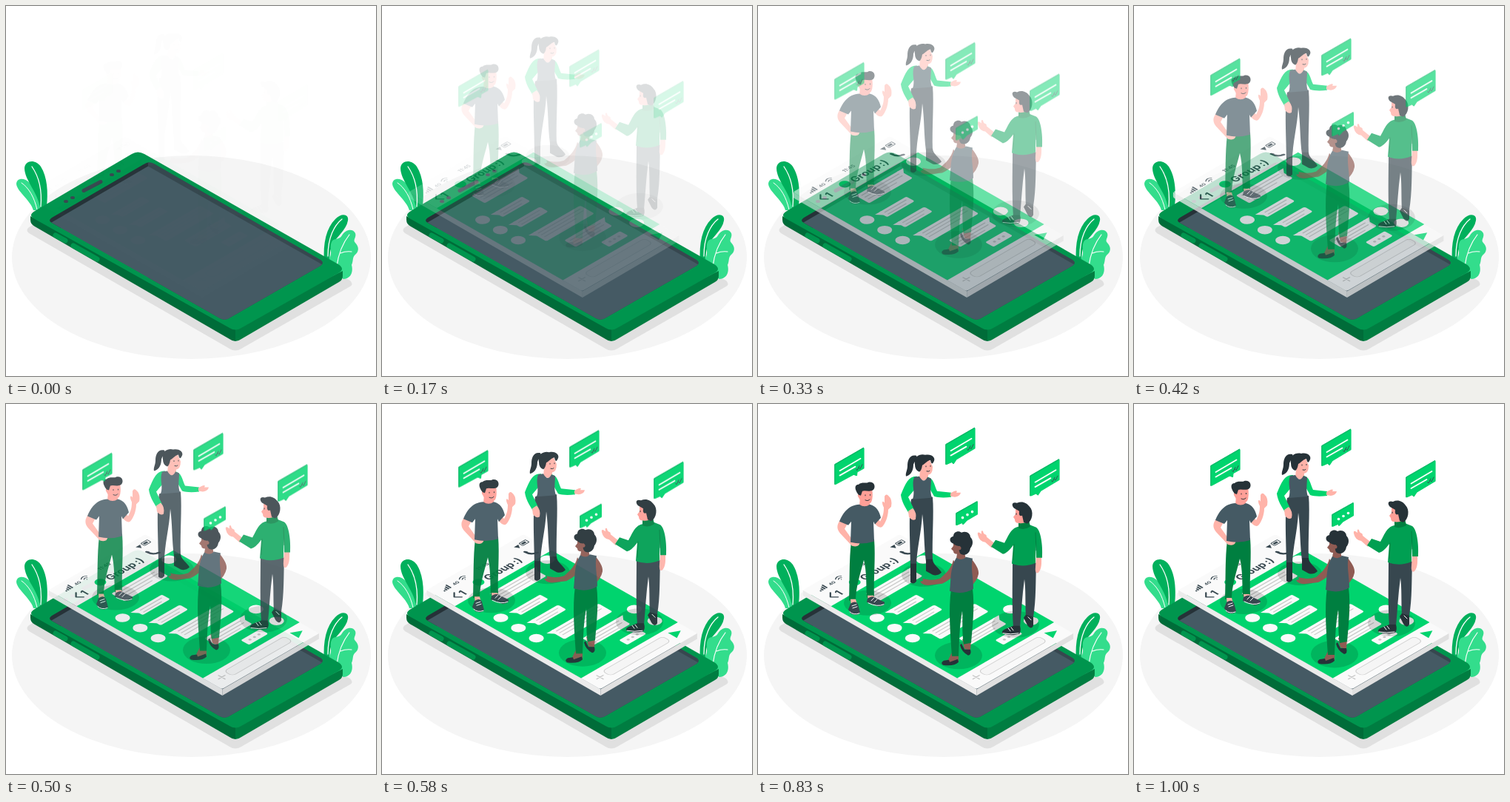
These frames come from a looping animation (500x500 px, 1.04 s). An HTML page:

```html
<!DOCTYPE html>
<html lang="en">
<head>
<meta charset="utf-8">
<title>Group chat</title>
<style>
html, body { margin: 0; width: 100%; height: 100%; overflow: hidden; background: #fff; }
svg { display: block; width: 100vw; height: 100vh; }
text { font-family: Inter, Roboto, sans-serif; font-weight: 700; fill: #37474f; word-spacing: -1.5px; }
.main { fill: #00d46e; }
.leaf { fill: #00b05c; }
.pale { fill: #33dd8c; }
.deep { fill: #009f52; }
.pine { fill: #007f40; }
.ink { fill: #263238; }
.coal { fill: #37474f; }
.slate { fill: #455a64; }
.skin { fill: #ffb3a9; }
.rose { fill: #ff9f97; }
.brown { fill: #8f5b53; }
.line { fill: none; stroke-linecap: round; stroke-linejoin: round; }
.white { stroke: #fff; }
.dark { stroke: #37474f; }
</style>
</head>
<body>
<svg viewBox="0 0 500 500">
  <ellipse cx="250.5" cy="339.5" rx="242.5" ry="137.5" fill="#f5f5f5"/>
  <path fill="#e0e0e0" d="M31 299L170 220L465 371Q470 376 465 379L318 463Q310 468 302 463L31 307Q26 303 31 299Z"/>

  <!-- plants -->
  <path class="pale" d="M37 276C33 262 14 250 14 240C15 232 25 232 32 239C42 248 46 262 46 276Z"/>
  <path class="line white" d="M21 239C31 246 38 258 42 275"/>
  <path class="leaf" d="M46 274C44 252 25 236 25 219C26 208 40 207 47 217C56 231 57 252 55 270Z"/>
  <path class="line white" stroke-width="1.3" d="M35 217C44 230 49 248 47 271"/>
  <path class="leaf" d="M430 346C428 320 433 300 445 288C453 279 464 281 462 290C460 303 446 312 441 323C437 332 437 340 438 350Z"/>
  <path class="line white" stroke-width="1.3" d="M454 288C444 296 435 312 435 338"/>
  <path class="pale" d="M433 346C444 336 436 328 440 319C442 313 450 317 454 310C458 302 469 300 472 307C474 313 468 316 472 320C477 325 477 331 473 335C467 340 470 344 467 350C469 357 468 368 456 369L440 360Z"/>
  <path class="line white" stroke-width="1.2" d="M464 309C453 323 449 336 447 352M452 334Q459 331 467 332"/>

  <!-- phone -->
  <path fill="#006c39" d="M33 284L33 289Q33 295 39 298L302 450Q306 453 310 453L310 430Z"/>
  <path fill="#007d41" d="M310 430L310 453Q314 453 318 450L450 373Q455 370 455 365L455 358Z"/>
  <path fill="#00954e" d="M39 277L170 200Q178 195 187 200L449 349Q459 355.500 449 361L318 435Q310 440 302 435L39 288Q29 283 39 277Z"/>
  <path class="line" stroke="#00954e" stroke-width="7" d="M67 310L80 317M91 324L123 342"/>
  <path class="line dark" stroke-width="5" d="M105 249.500L128 237.500"/>
  <g class="coal">
    <ellipse cx="81" cy="264" rx="3" ry="2"/><ellipse cx="90" cy="259" rx="3" ry="2"/>
    <ellipse cx="143" cy="228" rx="3" ry="2"/><ellipse cx="152" cy="223" rx="3" ry="2"/>
  </g>
  <clipPath id="glass"><path d="M62 286L186 214Q193 209 200 213L425 343Q431 347 425 351L303 421Q296 426 289 422L62 293Q56 290 62 286Z"/></clipPath>
  <g clip-path="url(#glass)">
    <path class="ink" d="M50 200H193V300H50Z"/>
    <path class="coal" d="M192 200H440V440H192Z"/>
    <path class="slate" d="M59 294L192 216.500L432 352L297 430Z"/>
  </g>

  <!-- floating chat screen -->
  <g id="card">
    <path fill="#ebebeb" d="M60 251.500L295 385.500V394L62 260Q60 259 60 257Z"/>
    <path fill="#e0e0e0" d="M295 385.500L425.500 310V317.500L295 394Z"/>
    <g id="face" transform="matrix(.866 -.5 .866 .494 60 251.500)">
      <rect width="151" height="271" rx="3" fill="#fafafa"/>
      <rect y="44" width="151" height="197" class="main"/>
      <path class="coal" d="M12 16v-2h2v2zM15 16v-4h2v4zM18 16v-6h2v6zM21 16v-8h2v8zM126 10h7l-3.500 6z"/>
      <text x="28" y="15.500" font-size="6">4G</text>
      <path class="line dark" stroke-width="1.200" d="M40 11Q44.500 7 49 11M42 13.500Q44.500 11 47 13.500M44.500 15.500v.1"/>
      <text x="75.500" y="14" font-size="7" text-anchor="middle">11:45</text>
      <rect x="135" y="9" width="10" height="6" rx="1" class="line dark"/>
      <rect x="136.500" y="10.500" width="6" height="3" class="coal"/>
      <path class="line dark" stroke-width="1.800" d="M18 25l-6 6l6 6"/>
      <text x="21" y="37" font-size="14">1</text>
      <circle cx="51" cy="30" r="6.500" class="main"/>
      <text x="61" y="36" font-size="14">Group :)</text>
      <path class="line dark" stroke-width="3" d="M128 25Q128 34 137 36M128 25l1 2M137 36l-2-1"/>
      <rect x="26" y="248" width="94" height="13" rx="5" fill="#f5f5f5" stroke="#d0d0d0"/>
      <path class="line" stroke="#c7c7c7" stroke-width="1.500" d="M11 254.500h10M16 249.500v10"/>
      <path class="main" d="M129 247.500v14l13-7z"/>
    </g>
  </g>

  <g id="shade" opacity="0">
    <g fill-opacity=".15">
      <ellipse cx="148" cy="267" rx="32" ry="17"/><ellipse cx="224" cy="229" rx="30" ry="16"/>
      <ellipse cx="271" cy="338" rx="32" ry="18.500"/><ellipse cx="348" cy="296" rx="32" ry="18"/>
    </g>
  </g>

  <g id="people">
    <!-- woman with ponytail -->
    <g>
      <path class="ink" d="M214 68C205 66 202 74 202 82C202 88 199 91 200 96C208 94 210 86 210 80Q212 74 216 73Z"/>
      <path class="coal" d="M207 127Q221 121 236 124C238 147 235 179 236 211L227 211C224 190 225 168 222 147C221 172 214 195 214 219L206 219C206 190 203 150 207 127Z"/>
      <path class="ink" d="M206 214H214V238Q210 243 206 239ZM227 208H236C236 215 245 220 248 226Q243 231 236 229L227 224Z"/>
      <path class="skin" d="M219 88H230V100Q224 104 218 99Z"/>
      <path class="main" d="M215 96C204 95 200 104 193 121C194 130 199 138 204 146L211 141L203 124L214 111ZM229 97C237 98 238 107 242 116L261 118V124C253 125 243 125 238 123L230 109Z"/>
      <path class="slate" d="M211 97L218 96Q224 107 229 97L234 99C234 108 232 116 235 125L209 127C213 116 207 108 211 97Z"/>
      <path class="skin" d="M203 143L209 139Q215 145 213 154Q209 157 204 151ZM260 119Q267 114 269 116L268 118L274 118Q273 123 266 124L260 123Z"/>
      <path class="skin" d="M219 77Q223 72 232 74L236 83Q236 95 228 94Q219 92 219 84Z"/>
      <path class="ink" d="M212 80C210 69 219 65 226 67C234 65 240 70 238 75C236 80 234 80 233 74C228 75 226 79 222 81Q221 88 218 90Q212 88 212 80Z"/>
      <path class="line" stroke="#263238" d="M227 82v1M233 81.500v1M228 89q3 1 4-.5"/>
    </g>
    <!-- waving man -->
    <g>
      <path class="pine" d="M126 184L157 181C159 207 156 232 157 259L147 260C146 240 147 225 143 209C139 226 132 245 132 264H123C124 236 123 209 126 184Z"/>
      <path class="skin" d="M125 262H132L135 273H126ZM148 257H156L160 265H149ZM112 154C105 162 107 168 111 173L127 190Q137 193 138 184L131 179L127 181L117 167L122 158ZM160 151L165 157C169 150 170 145 170 138C166 130 169 128 171 132L171 123Q173 119 176 122Q182 127 180 137L176 141C176 150 172 160 168 164Q164 167 158 160Z"/>
      <path class="coal" d="M125 268Q132 263 135 269L138 280Q135 285 126 282L122 276ZM148 261Q155 256 160 261L171 266Q172 271 163 272L147 266Z"/>
      <path class="line white" d="M127 271l6-2M128 274l6-2M124 279q5 5 13 2M153 264l4-4M157 266l4-4M149 267q12 6 21 2"/>
      <path class="rose" d="M138 124H151V137Q144 142 137 136Z"/>
      <path class="slate" d="M137 134Q144 139 151 134C160 136 164 143 166 152L158 161L156 157L157 184Q141 189 125 185L126 157L122 162L110 157C115 145 122 135 137 134Z"/>
      <path class="rose" d="M138 114L154 112Q156 125 153 131Q149 136 142 132Q137 128 135 123Q134 119 138 119Z"/>
      <path class="ink" d="M136 121C130 114 130 107 136 107C140 103 146 106 149 104C156 102 160 109 156 114C151 118 145 114 141 116L139 122Z"/>
      <path class="line" stroke="#263238" d="M145 121v1M151.500 120.500v1M145 128q4 2 6-1"/>
    </g>
    <!-- man on the right -->
    <g>
      <path class="coal" d="M344 213H376C375 238 376 262 372 286L362 286C361 267 362 248 360 235C357 257 356 278 354 300H345C343 270 344 241 344 213Z"/>
      <path class="ink" d="M345 298H354Q356 305 353 309Q340 312 330 308Q329 304 335 302ZM362 283L372 286V298Q369 304 364 297L359 287Z"/>
      <path class="line white" d="M338 301l3 4M342 300l3 4M331 308q10 2 21 0M365 286l4 4"/>
      <path class="skin" d="M319 186L309 178C309 172 305 177 304 170Q301 168 302 174Q296 169 297 175Q299 184 307 185L316 193ZM376 204H383C383 212 384 220 379 226Q374 229 375 218Z"/>
      <path class="deep" d="M352 164C341 166 338 178 333 186L321 182L315 191L331 201Q337 200 345 189L343 214Q359 220 375 213L375 184L376 206H384C385 188 382 169 376 165L366 161Z"/>
      <path class="rose" d="M348 140L360 139L366 158L354 163L353 159Q347 160 347 154L345 151L348 147Z"/>
      <path class="pine" d="M352 159Q359 161 366 155L368 164Q360 169 352 166Z"/>
      <path class="line" stroke="#008042" d="M346 188l-1 21M375 172l1 24"/>
      <path class="ink" d="M346 139C341 133 345 130 350 132C356 129 363 131 367 137C373 143 371 156 364 160L359 158L357 149Q352 151 353 143Z"/>
      <path class="line" stroke="#263238" d="M349 146v1.500"/>
    </g>
    <!-- woman in front -->
    <g>
      <path class="brown" d="M264 209C261 221 254 227 246 234C237 237 229 236 222 234Q225 238 219 238Q222 244 232 243L249 241C260 236 267 229 271 219ZM288 207C294 214 299 222 298 228Q296 238 287 245L282 240L289 228L284 218ZM262 334H271V347L255 348ZM276 316L288 316L287 331L279 329Z"/>
      <path class="pine" d="M261 248H290C293 273 290 298 288 321L278 323C275 306 277 288 276 278C272 299 272 321 271 339H262C260 311 257 276 261 248Z"/>
      <path class="ink" d="M258 344L259 347L270 343L271 347Q265 353 250 351Q246 348 251 345ZM275 322L279 330L287 330Q289 337 284 338Q275 333 273 324Z"/>
      <path class="brown" d="M264 184L276 186L281 208Q273 214 268 207L269 201Q264 201 264 197L261 194L264 190Z"/>
      <path class="slate" d="M268 206Q276 211 281 205L290 207C287 219 291 232 291 248Q277 257 259 251C261 237 259 220 268 206Z"/>
      <path class="ink" d="M264 187C258 185 258 178 264 177C264 170 272 169 275 172C281 169 287 173 287 178C292 183 290 190 287 193C286 201 279 204 274 201Q270 197 273 190Q268 191 264 187Z"/>
      <circle cx="272" cy="193" r="2.500" class="brown"/>
    </g>
  </g>

  <g id="talk"></g>
</svg>
<script>
const $ = id => document.getElementById(id);
const add = (id, markup) => $(id).insertAdjacentHTML('beforeend', markup);
const dot = (x, y, r, fill) => `<circle cx="${x}" cy="${y}" r="${r}" fill="${fill}"/>`;

// Message lying on the screen; tail: -1 left, 1 right, 0 none
function message(x, y, w, h, tail, lines) {
  let out = `<rect x="${x}" y="${y}" width="${w}" height="${h}" rx="2.5" fill="#fafafa"/>`;
  if (tail) {
    const edge = tail < 0 ? x : x + w;
    out += `<path fill="#fafafa" d="M${edge + tail * 6} ${y}H${edge - tail * 4}V${y + 7}H${edge}Z"/>`;
  }
  for (let i = 0; i < lines; i++) {
    const len = i === lines - 1 ? w * .65 : w - 10;
    out += `<path class="line" stroke="#c7c7c7" stroke-width="1.3" d="M${x + 5} ${y + 4.5 + i * 5}h${len}"/>`;
  }
  add('face', out);
}

message(44, 54, 68, 21, 1, 3);
message(39, 95, 43, 13, -1, 2);
message(39, 123, 43, 13, -1, 2);
message(40, 153, 75, 22, -1, 3);
message(55, 188, 57, 18, 1, 3);
message(81, 219, 30, 13, 0, 0);
for (const x of [89, 96, 103]) add('face', dot(x, 225.5, 1.8, '#c7c7c7'));
for (const y of [96, 123.5, 151.5]) add('face', dot(19.7, y, 8.2, '#fafafa'));
for (const y of [53, 189, 221]) add('face', dot(135, y, 8.2, '#fafafa'));

// Upright speech bubble
function bubble(x, y, shape, inside) {
  const d = `M0 0${shape}Z`;
  add('talk', `<g transform="translate(${x} ${y})" stroke-linejoin="round">
    <path d="${d}" transform="translate(-.8 -.6)" fill="#00b863" stroke="#00b863"/>
    <path d="${d}" class="main"/>${inside}</g>`);
}
const words = `<path class="line white" stroke-width="1.8" d="M6 8L34 -8.500M6 14.500L27 2.500"/>
  <path class="line" stroke="#37474f" stroke-width=".9" d="M28 6l1.500 1.500l3-6M32 4l1.500 1.500l3-6"/>`;
const left = 'L39 -22.500V5L14 20L10 26L8 23.500L0 27';
const right = 'L39 -22.500V5L30 10L29.500 15L25 13.500L0 27';
bubble(104.5, 84, right, words);
bubble(254.5, 57, left, words);
bubble(368.5, 99.5, left, words);
bubble(268.5, 150, 'L28.500 -16V1L14 9.500L9 15L8 12.500L0 16',
  dot(8, 5.5, 1.8, '#fff') + dot(14.5, 1.5, 1.8, '#fff') + dot(21, -2.5, 1.8, '#fff'));

// cubic-bezier(.36, -.01, .5, 1.38)
const curve = (a, b, s) => 3 * a * s * (1 - s) ** 2 + 3 * b * s * s * (1 - s) + s ** 3;
function ease(p) {
  if (p >= 1) return 1;
  let lo = 0, hi = 1;
  for (let i = 0; i < 24; i++) {
    const mid = (lo + hi) / 2;
    if (curve(.36, .5, mid) < p) lo = mid; else hi = mid;
  }
  return curve(-.01, 1.38, lo);
}

const LOOP = 1040, STEP = 1000 / 24, SHIFT = 30;

function place(id, x, y, alpha) {
  $(id).setAttribute('transform', `translate(${x} ${y})`);
  $(id).setAttribute('opacity', Math.max(0, Math.min(1, alpha)));
}

function draw(now) {
  const step = Math.min(24, Math.floor((now % LOOP + 5) / STEP));
  const t = (step + 1) * STEP;
  const slide = ease(t / 900), drop = ease(t / 1000);
  const rest = SHIFT * (1 - drop);
  place('card', SHIFT * (slide - 1), 0, slide);
  place('shade', 0, -rest, drop);
  place('people', 0, -rest, drop);
  place('talk', 0, rest, drop);
  requestAnimationFrame(draw);
}
draw(0);
</script>
</body>
</html>
```
